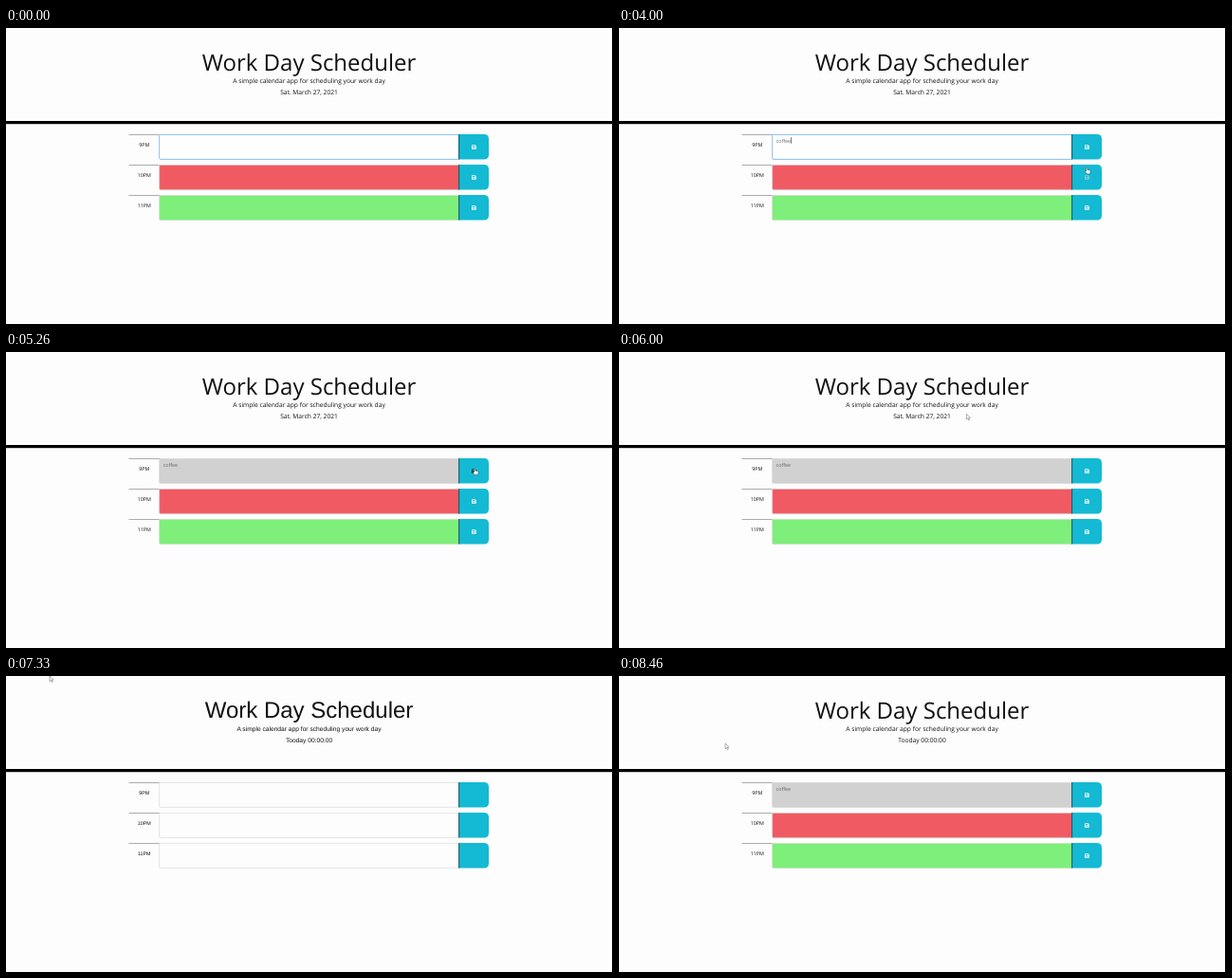
Recreate the animation shown at these times as an HTML page. Size 640 by 312 pixels, loop 8530 ms.

```html
<!DOCTYPE html>
<html lang="en">
<head>
<meta charset="utf-8">
<title>Work Day Scheduler</title>
<style>
  html, body { margin: 0; width: 100%; height: 100%; overflow: hidden; background: #fdfdfd; }
  svg { display: block; width: 100vw; height: 100vh; }
  text { font-family: "Open Sans", sans-serif; fill: #111; text-anchor: middle; text-rendering: geometricPrecision; }
  .plain text { font-family: "Liberation Sans", Arial, sans-serif; }
  .title { font-size: 24px; }
  .lead { font-size: 6.667px; }
  .hour { font-size: 5.333px; }
  #note { font-size: 5.333px; fill: #6a6a6a; text-anchor: start; }
  .plain .icon { display: none; }
</style>
</head>
<body>
<svg id="stage" viewBox="0 0 640 312" preserveAspectRatio="none">
  <rect width="640" height="312" fill="#fdfdfd"/>
  <text class="title" id="title" x="319.5" y="45">Work Day Scheduler</text>
  <text class="lead" x="319.5" y="58.3">A simple calendar app for scheduling your work day</text>
  <text class="lead" id="date" x="319.5" y="70.3"></text>
  <rect y="98" width="640" height="3.2"/>
  <rect x="639" width="1" height="312"/>
  <g id="rows"></g>
  <text id="note" x="165.7" y="120.6"></text>
  <rect id="caret" y="115.3" width=".6" height="6.4" fill="#222"/>
  <g id="arrow"><path d="M0 0V5.6L1.4 4.4L2.4 6.6L3.3 6.2L2.3 4.1H4Z" fill="#fff" stroke="#777" stroke-width=".6"/></g>
  <g id="hand"><path d="M.3 .3Q1-.3 1.4 .5V2.6L4 3.2Q4.7 3.4 4.6 4.2L4 7H.9L-1.2 4.4Q-1.2 3.5-.2 4L.2 4.4Z" fill="#fff" stroke="#234" stroke-width=".45"/></g>
  <g id="beam"><path d="M-1-2.7Q0-2.7 0-2V2Q0 2.7-1 2.7M1-2.7Q0-2.7 0-2M0 2Q0 2.7 1 2.7" fill="none" stroke="#888" stroke-width=".4"/></g>
</svg>
<script>
const LOOP = 8530, STEP = 1000 / 15;
const $ = id => document.getElementById(id);
const WHITE = '#fdfdfd', GREY = '#d1d1d1', RED = '#f05a62', GREEN = '#7eef7a';

const typed = [[0, ''], [1130, 'c'], [1260, 'co'], [1800, 'cof'], [2260, 'coff'], [2460, 'coffe'],
  [2660, 'coffee'], [7330, ''], [7460, 'coffee']];
const caretOn = [[0, 0], [460, 1], [1000, 0], [1130, 1], [3260, 0], [3730, 1], [4260, 0], [4660, 0]];
const phase = [[0, 'edit'], [4660, 'saved'], [7330, 'plain'], [7460, 'loading'], [7600, 'saved']];
const moves = [
  [[3730, 400, 150], [3860, 470, 156], [4000, 492.5, 146.8], [4200, 494, 138], [4530, 493, 122.5],
   [5266, 493.5, 122.5], [5460, 540, 112], [5660, 572, 98], [5860, 480, 76], [6066, 330, 62],
   [6200, 210, 38], [6460, 46, 0]],
  [[6460, 46, 0], [7990, 46, 0], [8130, 31, 12], [8300, 66, 44], [8466, 112, 71]]
];

const at = (table, t) => table.filter(r => r[0] <= t).pop()[1];

function pointer(t) {
  const path = moves.find(m => t >= m[0][0] - 5 && t < m[m.length - 1][0]) || (t > 8400 && moves[1]);
  if (!path) return null;
  const i = Math.max(1, path.findIndex(p => p[0] > t));
  const last = path[path.length - 1];
  if (t >= last[0]) return last.slice(1);
  const [a, b] = [path[i - 1], path[i]];
  const u = Math.max(0, (t - a[0]) / (b[0] - a[0]));
  const s = u * u * (3 - 2 * u);
  return [a[1] + (b[1] - a[1]) * s, a[2] + (b[2] - a[2]) * s];
}

$('rows').innerHTML = ['9PM', '10PM', '11PM'].map((hour, i) => `
  <g transform="translate(0 ${112 + 32 * i})">
    <rect x="129.5" y=".2" width="32.2" height=".6" fill="#777"/>
    <text class="hour" x="145.7" y="13.1">${hour}</text>
    <rect class="field" x="161.7" y=".4" width="316" height="26" rx="1" stroke="#ccc" stroke-width=".5"/>
    <path d="M477.5 0H504Q509 0 509 5V21.6Q509 26.6 504 26.6H477.5Z" fill="#14bad3"/>
    <rect x="477.3" width=".8" height="26.6" fill="#15333a"/>
    <path class="icon" fill-rule="evenodd" d="M491.5 11.2H494.6L495.7 12.3V15.3Q495.7 15.8 495.2 15.8H491.5Q491 15.8 491 15.3V11.7Q491 11.2 491.5 11.2Z
      M491.7 11.9V13.2H494.3V11.9ZM493.3 13.8A.65 .65 0 1 0 493.31 13.8Z"/>
  </g>`).join('');
const fields = [...document.querySelectorAll('.field')];
const icons = [...document.querySelectorAll('.icon')];

function place(id, pos) {
  const el = $(id);
  el.style.display = pos ? '' : 'none';
  if (pos) el.setAttribute('transform', `translate(${pos[0]} ${pos[1]})`);
}

function draw(ms) {
  const t = Math.floor((ms % LOOP + 7) / STEP) * STEP;
  const mode = at(phase, t), plain = mode === 'plain', edit = mode === 'edit';
  $('stage').classList.toggle('plain', plain);
  $('title').setAttribute('y', plain ? 44.2 : 45);
  $('date').textContent = t >= 7330 ? 'Tooday 00:00:00' : 'Sat. March 27, 2021';

  const fills = plain ? [WHITE, WHITE, WHITE] : [edit ? '#fff' : GREY, RED, GREEN];
  fields.forEach((f, i) => f.setAttribute('fill', fills[i]));
  fields[0].setAttribute('stroke', edit ? '#7ab8f0' : '#ccc');
  fields[0].setAttribute('stroke-width', edit ? .9 : .5);

  const note = $('note'), word = at(typed, t);
  note.textContent = word;
  const caret = $('caret');
  caret.style.display = edit && at(caretOn, t) ? '' : 'none';
  caret.setAttribute('x', 165.8 + (word ? note.getComputedTextLength() : 0));

  const pos = pointer(t);
  let kind = '', row = -1;
  if (pos) {
    const [x, y] = pos, i = Math.floor((y - 112) / 32);
    const inRow = i >= 0 && i < 3 && y - 112 - 32 * i < 26.6;
    kind = inRow && x > 477 && x < 509 ? 'hand' : inRow && x > 161 && x < 477 ? 'beam' : 'arrow';
    if (kind === 'hand') row = i;
  }
  for (const id of ['arrow', 'hand', 'beam']) place(id, kind === id ? pos : null);
  icons.forEach((icon, i) => icon.setAttribute('fill', i !== row ? '#fff' : i ? '#8ccbd6' : '#16262b'));
}

const start = performance.now();
function tick() {
  draw(performance.now() - start);
  requestAnimationFrame(tick);
}
tick();
</script>
</body>
</html>
```
